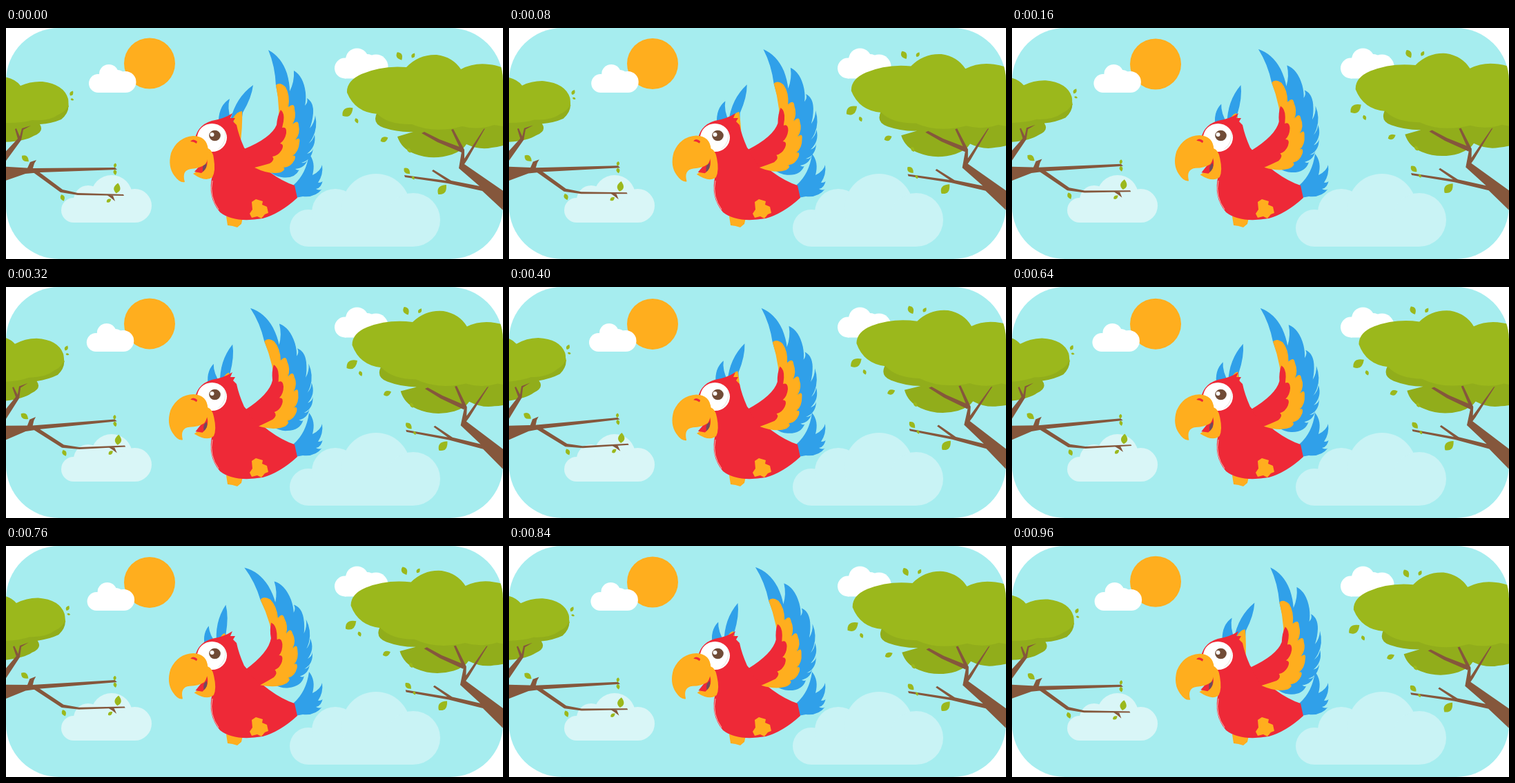
An HTML page with a canvas that plays this animation: 720 by 336 pixels, repeating every 1 s.

```html
<!DOCTYPE html>
<html lang="en">
<head>
<meta charset="utf-8">
<title>Flying parrot</title>
<style>
html, body { margin: 0; width: 100%; height: 100%; overflow: hidden; background: #fff; }
canvas { display: block; width: 720px; height: 336px; }
</style>
</head>
<body>
<canvas id="stage" width="720" height="336"></canvas>
<script>
const ctx = document.getElementById('stage').getContext('2d');
const LOOP = 1000, STEP = 40;
const SKY = '#a6edef', RED = '#ee2937', ORANGE = '#ffae1e', BLUE = '#30a0e9';
const LEAF = '#9bb81c', SHADE = '#91ad1b', BARK = '#85573c';

// 0 -> 1 -> 0 over one period
const swing = (t, period) => 1 - Math.abs(1 - 2 * (t % period) / period);

function fill(color, d) {
  ctx.fillStyle = color;
  ctx.fill(new Path2D(d));
}

function line(color, width, d) {
  ctx.strokeStyle = color;
  ctx.lineWidth = width;
  ctx.stroke(new Path2D(d));
}

function disc(color, x, y, rx, ry = rx) {
  ctx.fillStyle = color;
  ctx.beginPath();
  ctx.ellipse(x, y, rx, ry, 0, 0, Math.PI * 2);
  ctx.fill();
}

function turned(x, y, angle, draw) {
  ctx.save();
  ctx.translate(x, y);
  ctx.rotate(angle);
  ctx.translate(-x, -y);
  draw();
  ctx.restore();
}

// puffs: [x, y, r]; the first and last one end the flat base
function cloud(color, bottom, puffs) {
  const [a, z] = [puffs[0], puffs[puffs.length - 1]];
  const top = Math.max(a[1], z[1]) - 12;
  puffs.forEach(p => disc(color, ...p));
  ctx.fillRect(a[0], top, z[0] - a[0], bottom - top);
}

// leaves: [x, y, length, degrees]
function leaves(list) {
  for (const [x, y, size, deg] of list) {
    ctx.save();
    ctx.translate(x, y);
    ctx.rotate(deg * Math.PI / 180);
    const h = size / 2, w = size * 0.62;
    ctx.fillStyle = LEAF;
    ctx.beginPath();
    ctx.moveTo(-h, 0);
    ctx.quadraticCurveTo(-h * 0.2, -w, h, 0);
    ctx.quadraticCurveTo(-h * 0.2, w, -h, 0);
    ctx.fill();
    ctx.restore();
  }
}

function leftTree() {
  fill(SHADE, 'M-20 110 L90 108 Q93 122 80 133 Q66 139 49 140 Q56 151 40 157 Q24 167 -20 166Z');
  fill(LEAF, 'M-20 70 Q10 69 21 84 Q36 77 53 78 Q84 82 90 103 Q93 119 76 126 Q62 136 38 134 Q18 140 -20 137Z');
  fill(BARK, 'M-10 190 L17 161 L13 147 L15 146 L20 158 L23 146 L36 142 L25 148 L22 163 L-10 207Z');
  fill(BARK, 'M-12 201 L38 204 L158 203 L161 206 L50 210 L28 212 L-12 226Z');
  fill(BARK, 'M42 205 L82 235 L104 240 L170 242 L171 244 L104 243 L79 239 L38 209Z');
  fill(BARK, 'M30 206 L35 195 L44 192 L41 197 L38 207Z');
  fill(BARK, 'M145 242 L155 244 L158 252 L152 247Z');
  leaves([
    [28, 190, 13, 40], [158, 200, 7, 100], [158, 210, 8, 80], [161, 233, 15, -80],
    [149, 251, 8, -35], [82, 247, 10, 70], [95, 95, 8, -60], [96, 104, 5, 20], [88, 113, 7, 30]
  ]);
}

function rightTree() {
  fill(SHADE, 'M538 122 Q529 139 547 145 Q568 152 590 151 L567 158 Q573 176 592 183 Q618 193 646 184 Q662 178 667 169 Q686 178 704 174 Q725 173 770 150 L770 110Z');
  fill(LEAF, 'M494 94 Q493 77 515 67 Q545 54 580 57 Q598 38 624 39 Q647 42 659 60 Q678 50 700 53 Q726 55 770 85 L770 137 Q745 148 707 141 Q684 149 661 143 Q620 154 588 140 Q554 141 538 125 Q506 123 494 94Z');
  fill(BARK, 'M656 204 L660 180 L645 148 L648 147 L664 177 L664 190 L692 147 L694 146 L668 192 L664 198 L735 247 L735 279 L690 237 L640 226 L578 217 L577 214 L638 222 L617 208 L619 206 L645 222 L686 230Z');
  fill(BARK, 'M660 181 L625 166 L602 153 L606 151 L628 162 L660 174Z');
  leaves([
    [570, 41, 13, 60], [590, 40, 8, -60], [495, 122, 19, -38], [508, 135, 8, 65],
    [548, 162, 12, -25], [584, 178, 8, 60], [581, 208, 12, 45], [590, 218, 6, 60], [632, 235, 18, -50]
  ]);
}

function farWing() {
  fill(BLUE, 'M308 134 Q309 112 324 103 Q320 116 326 134 L323 160Z');
  fill(BLUE, 'M325 134 Q333 101 358 83 Q356 101 343 123 L337 165Z');
  fill(ORANGE, 'M329 131 Q335 121 342 121 Q343 143 339 172 L332 156Z');
}

function nearWing() {
  fill(BLUE, 'M380 32 Q399 42 407 66 Q411 80 411 92 Q418 78 417 62 Q431 70 434 94 Q435 105 433 113 Q438 108 436 102 Q446 108 445 124 Q444 136 440 146 Q447 138 448 127 Q452 145 444 160 Q440 167 437 169 Q445 164 447 155 Q450 172 436 183 Q444 181 445 175 Q443 192 428 196 Q435 197 437 191 Q433 204 419 205 Q423 208 425 206 Q418 220 399 217 Q389 216 380 207 L400 130 L391 84 Q390 56 380 32Z');
  fill(ORANGE, 'M391 83 Q397 78 405 86 Q412 98 409 115 Q418 108 418 118 Q421 130 415 140 Q424 132 424 142 Q427 153 419 163 Q427 157 425 167 Q424 180 415 186 Q421 184 418 192 Q412 203 402 203 Q406 206 398 210 Q382 214 360 203 L394 160 Q398 118 391 83Z');
  fill(RED, 'M398 119 Q404 124 402 136 L400 145 Q407 143 406 153 Q404 163 397 168 Q404 169 399 178 Q394 186 386 187 Q390 192 382 197 Q372 200 360 203 L345 176 Q384 160 392 141 Q393 128 398 119Z');
}

function body() {
  fill(BLUE, 'M411 242 L417 228 Q435 212 439 183 Q449 195 444 214 Q456 208 458 199 Q460 213 452 225 Q459 225 459 221 Q457 233 449 234 Q455 237 458 234 Q448 247 430 245 L414 248Z');
  fill(ORANGE, 'M319 274 L343 276 L341 285 L335 290 L328 288 L321 287Z');
  fill(RED, 'M273 167 Q275 142 298 135 Q316 132 328 124 L325 131 L332 131 L329 136 L334 141 Q337 156 345 174 Q362 195 381 209 Q400 223 418 229 L422 247 Q397 270 372 277 Q330 284 310 268 Q291 246 299 214 L288 180Z');
  line('#f7b5b4', 1, 'M299 222 Q294 245 308 264');
  fill(ORANGE, 'M356 253 L362 249 L372 252 L371 257 L378 260 L380 269 L375 271 L370 277 L364 274 L356 276 L353 270 L357 264Z');
}

function head(open) {
  disc('#fff', 298.5, 159.5, 21.5, 20.5);
  line('#e3e6e2', 1, 'M317 150 Q321 165 308 176');
  disc('#704b36', 302.5, 156.5, 8.3, 7.8);
  disc('#fff', 298.5, 155, 3);

  turned(296, 185, -0.06 * open, () => {
    fill(ORANGE, 'M291 174 Q300 178 301 190 Q304 208 299 217 Q289 225 271 212 L286 203Z');
    fill(RED, 'M273 209 Q281 200 291 189 Q294 203 283 211Z');
    fill('#704b5c', 'M285 204 Q285 199 290 196 Q292 204 285 209Z');
  });
  turned(290, 168, 0.055 * open, () => {
    fill(ORANGE, 'M271 157 Q291 157 293 177 Q294 190 289 198 Q281 204 268 205 Q254 207 259 224 Q252 226 244 215 Q234 202 239 182 Q248 159 271 157Z');
    fill(RED, 'M267 165 Q271 160 277 165 L276 168 Q272 165 267 165Z');
  });
}

function draw(t) {
  const sway = swing(t, LOOP), flap = swing(t, LOOP / 2);
  ctx.clearRect(0, 0, 720, 336);
  ctx.save();
  ctx.beginPath();
  ctx.roundRect(0, 0, 720, 336, 77);
  ctx.clip();
  ctx.fillStyle = SKY;
  ctx.fillRect(0, 0, 720, 336);

  cloud('#d9f6f7', 283, [[98, 265, 18], [119, 250, 21], [153, 244, 30], [186.5, 258.5, 24.5]]);
  cloud('#c9f3f5', 318, [[438, 291, 27], [477, 268, 34], [536, 262, 50], [590, 279, 39]]);
  disc(ORANGE, 208, 51.5 + 3 * sway, 37);

  ctx.save();
  ctx.translate(-5 * sway, 0);
  cloud('#fff', 94, [[133.5, 80.5, 13.5], [149, 67, 14], [161, 75, 14], [173, 78.5, 15.5]]);
  ctx.restore();
  cloud('#fff', 73.5, [[491, 58.5, 15], [508.5, 46, 16.5], [523, 54, 16], [536, 56, 17.5]]);

  turned(0, 205, -0.104 * sway, leftTree);
  turned(722, 264, 0.067 * sway, rightTree);

  turned(345, 193, -0.375 * flap, farWing);
  body();
  turned(361, 170, -0.26 * flap, nearWing);
  head(Math.min(1, flap * 1.5));
  ctx.restore();
}

function tick() {
  const t = performance.now() % LOOP;
  draw(Math.floor(t / STEP) * STEP);
  requestAnimationFrame(tick);
}
tick();
</script>
</body>
</html>
```
